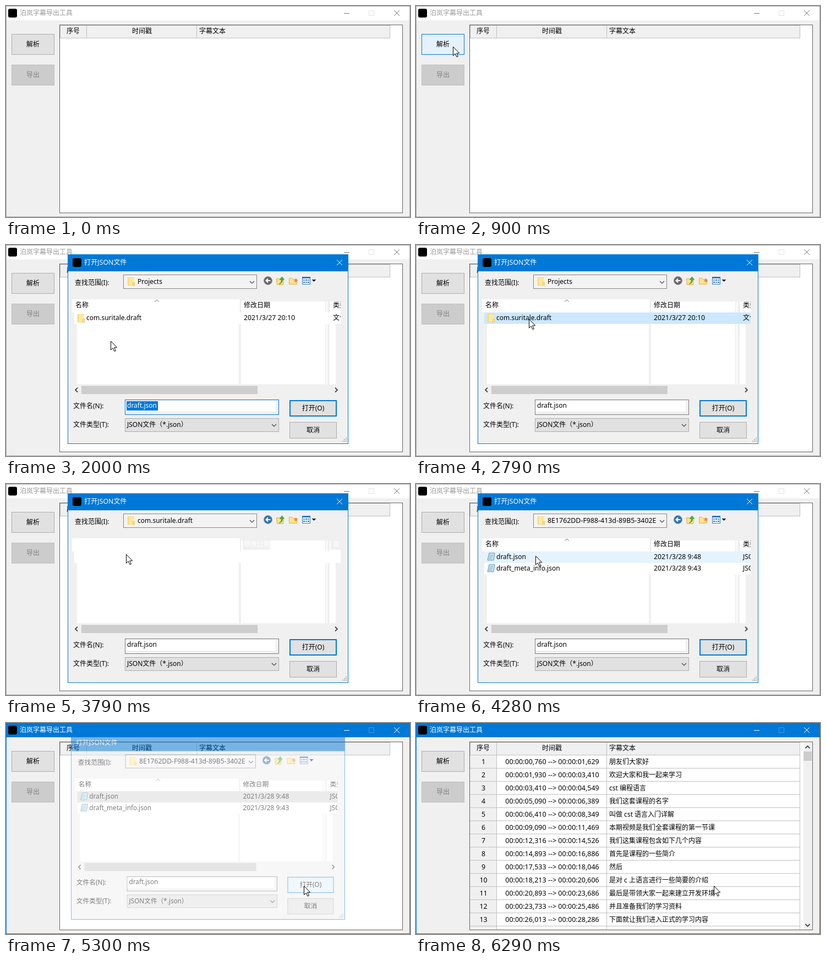
Recreate the animation shown at these times as an HTML page. Size 734 px wide and 385 px high, loop 8000 ms.

```html
<!DOCTYPE html>
<html lang="zh-CN">
<head>
<meta charset="utf-8">
<style>
html, body { margin: 0; width: 100%; height: 100%; overflow: hidden; }
body > svg { display: block; width: 734px; height: 385px; }
text { font: 12px "Noto Sans", "Noto Sans CJK SC", "Noto Sans CJK", sans-serif; white-space: pre; }
</style>
</head>
<body>
<svg id="stage" viewBox="0 0 734 385"></svg>
<script>
const LOOP = 8000;
const BLUE = '#0078d7', FACE = '#f0f0f0', GRID = '#c0c0c0';
const GUID = '8E1762DD-F988-413d-89B5-3402E7A1C95F';
const FOLDER = 'com.suritale.draft';

const LINES = [
  ['00,760', '01,629', '朋友们大家好'],
  ['01,930', '03,410', '欢迎大家和我一起来学习'],
  ['03,410', '04,549', 'cst 编程语言'],
  ['05,090', '06,389', '我们这套课程的名字'],
  ['06,410', '08,349', '叫做 cst 语言入门详解'],
  ['09,090', '11,469', '本期视频是我们全套课程的第一节课'],
  ['12,316', '14,526', '我们这集课程包含如下几个内容'],
  ['14,893', '16,886', '首先是课程的一些简介'],
  ['17,533', '18,046', '然后'],
  ['18,213', '20,606', '是对 c 上语言进行一些简要的介绍'],
  ['20,893', '23,686', '最后是带领大家一起来建立开发环境'],
  ['23,733', '25,486', '并且准备我们的学习资料'],
  ['26,013', '28,286', '下面就让我们进入正式的学习内容']
];

// start of each phase and its step length, ms
const PHASES = [[0, 999], [120, 78], [990, 999], [1140, 80], [2000, 79], [2790, 999], [3010, 999],
  [3240, 85], [3410, 999], [3570, 999], [3790, 999], [3870, 999], [4120, 78.8], [4910, 999],
  [5030, 999], [5140, 999], [5220, 80], [5840, 75], [6290, 9999]];

// pointer path: time, x, y
const PATH = [[120, 408, 351], [300, 350, 304], [700, 112, 112], [900, 67, 74], [1380, 67, 74],
  [1940, 190, 175], [2000, 190, 175], [2400, 205, 135], [3200, 205, 135], [3410, 218, 128],
  [4120, 218, 128], [4360, 216, 133], [4829, 505, 263], [4910, 526, 284], [5030, 541, 297]];

function snap(t) {
  const [start, step] = PHASES.findLast(p => p[0] <= t);
  return start + Math.floor((t - start) / step) * step;
}

function pointer(t) {
  const i = PATH.findLastIndex(p => p[0] <= t), a = PATH[i], b = PATH[i + 1];
  if (!b) return [a[1], a[2]];
  const u = (t - a[0]) / (b[0] - a[0]);
  return [a[1] + (b[1] - a[1]) * u, a[2] + (b[2] - a[2]) * u];
}

const rect = (x, y, w, h, fill, more = '') =>
  `<rect x="${x}" y="${y}" width="${w}" height="${h}" fill="${fill}" ${more}/>`;
const box = (x, y, w, h, fill, line, lw = 1) =>
  rect(x + lw / 2, y + lw / 2, w - lw, h - lw, fill, `stroke="${line}" stroke-width="${lw}"`);
const path = (d, line, lw = 1, fill = 'none') =>
  `<path d="${d}" fill="${fill}" stroke="${line}" stroke-width="${lw}"/>`;
const text = (x, cy, s, fill = '#000', size = 12, anchor = 'start') =>
  `<text x="${x}" y="${cy + 4}" fill="${fill}" text-anchor="${anchor}" style="font-size:${size}px">${s}</text>`;
const mid = (x, cy, s, fill, size) => text(x, cy, s, fill, size, 'middle');
const clip = (x, y, w, h, s) =>
  `<svg x="${x}" y="${y}" width="${w}" height="${h}" viewBox="${x} ${y} ${w} ${h}">${s}</svg>`;
const cross = (x, y, line) => path(`M${x} ${y}l10 10m0 -10l-10 10`, line);
const chevron = (x, y, dx, dy, lw = 1.2) => // dx, dy point the way
  path(dy ? `M${x - 4} ${y - 2 * dy}l4 ${4 * dy}l4 ${-4 * dy}` : `M${x - 2 * dx} ${y - 4}l${4 * dx} 4l${-4 * dx} 4`, '#444', lw);

function button(x, y, w, h, label, state = 'normal', lw = 1) {
  const [fill, line, ink] = {
    normal: ['#e1e1e1', '#adadad', '#000'],
    main: ['#e1e1e1', BLUE, '#000'],
    fading: ['#e3e9ef', '#5c9bd0', '#000'],
    hover: ['#e5f1fb', BLUE, '#000'],
    pressed: ['#cce4f7', '#005499', '#000'],
    disabled: ['#cccccc', '#bfbfbf', '#838383']
  }[state];
  return box(x, y, w, h, fill, line, lw) + mid(x + w / 2, y + h / 2, label, ink);
}

function table(t) {
  let s = box(97, 34, 624, 344, '#fff', '#646464') + box(98, 35, 600, 24, FACE, GRID);
  s += mid(122, 46, '序号') + mid(247, 46, '时间戳') + text(351, 46, '字幕文本');
  let bottom = 59;
  if (t >= 5380) {
    bottom = 377;
    s += rect(98, 59, 48, 318, FACE);
    LINES.forEach(([from, to, words], i) => {
      const y = 71 + 24 * i;
      s += mid(122.5, y, i + 1, '#000', 12.4) +
        mid(247.5, y, `00:00:${from} --&gt; 00:00:${to}`, '#000', 12.5) + text(351, y, words) +
        path(`M98 ${y + 11.5}H697`, GRID);
    });
    // rows keep loading, so the thumb shrinks
    const thumb = Math.max(17, 309 * 13 / ((t - 5310) * .243));
    s += rect(704, 36, 16, 341, FACE) + rect(704, 52, 15, thumb, '#cdcdcd') +
      chevron(711.5, 44, 0, -1, 1.8) + chevron(711.5, 369, 0, 1, 1.8);
  }
  return s + path(`M146.5 35V${bottom}M346.5 35V${bottom}M697.5 35V${bottom}`, GRID);
}

function mainWindow(t, px, py) {
  const active = t >= 990 && t < 1140 || t >= 5220;
  const ink = active ? '#fff' : '#999';
  let state = 'normal';
  if (t >= 120 && t < 990 && px >= 10 && px < 88 && py >= 51 && py < 89) state = 'hover';
  if (t >= 990 && t < 1140) state = 'pressed';
  if (t >= 1140 && t < 1460) state = 'fading';
  return box(0, 0, 734, 385, FACE, active ? BLUE : '#a9a9a9') +
    rect(1, 1, 732, 25, active ? BLUE : '#fff') +
    rect(4, 5, 16, 16, '#000', 'rx="3"') + text(25, 13, '泊岚字幕导出工具', ink) +
    path('M614 13.5h10', active ? '#fff' : '#777') + box(659, 8, 10, 10, 'none', active ? '#3f98df' : '#e2e2e2') +
    cross(705, 8, active ? '#fff' : '#777') +
    button(10, 51, 78, 38, '解析', state) + button(10, 107, 78, 38, '导出', 'disabled') + table(t);
}

const folder = (x, y) => rect(x, y, 12, 15, '#f7d774') + rect(x + 2, y + 1, 10, 13, '#ffe9a2') +
  path(`M${x + 9.5} ${y + 9}v6h3v-6z`, '#f0c850', 1, '#ffe08a');
const note = (x, y) => path(`M${x + 3} ${y}h10l-2 13h-11z`, '#5d91ad', 1, '#c5e6f2') +
  path(`M${x + 4} ${y + 4}h6m-7 3h6m-7 3h6`, '#6ea9c2');

function toolbar(t) {
  let s = `<circle cx="476" cy="65" r="7.5" fill="${t < 3010 ? '#686868' : '#2a75b3'}" stroke="#999"/>` +
    path('M480.5 65h-8m3.500 -3.500l-3.500 3.500l3.500 3.500', '#fff', 2);
  s += path('M491.5 61.500h5l2 2h6l-1 9h-11z', '#d9b244', 1, '#ffe08a') +
    path('M496 71q5 -2 4 -8h-3l4.500 -5l4 5h-3q0 7 -6.500 8z', '#2c8a2c', .7, '#46b546');
  s += path('M514.5 60.500h5l2 2h7v9h-14z', '#e0b24a', 1, '#ffe28f') +
    path('M523 65h7m-3.500 -3.500v7m-2.500 -6l5 5m0 -5l-5 5', '#e8732c');
  s += box(538, 58, 15, 14, '#fff', '#2878c8') + rect(538, 58, 15, 3, '#2878c8');
  for (let i = 0; i < 6; i++) s += rect(540 + i % 3 * 4, 63 + (i > 2) * 4, 3, 2, i % 2 ? '#2b66a8' : '#4b8fd0');
  return s + path('M555.500 63h8l-4 4z', 'none', 0, '#222');
}

function listRow(y, icon, name, date, kind, fill = '#fff', size = 12) {
  return rect(124, y, 484, 21, fill) + icon(130, y + 3) +
    text(146, y + 10, name, '#000', size) + text(432, y + 10, date, '#000', 12.3) + text(594, y + 10, kind);
}

function list(t, py) {
  const closing = t >= 5220;
  let s = rect(120, 99, 305, 24, '#fff') + rect(129, 144, 294, 110, '#fff') + rect(427, 103, 153, 151, '#fff') +
    rect(582, 103, 2, 151, '#fff') + rect(588, 103, 20, 20, '#fff') + rect(588, 144, 11, 110, '#fff');
  if (t >= 3790 && t < 3870) {
    s += rect(124, 123, 484, 21, '#fff') + rect(430, 103, 50, 17, FACE) + rect(590, 103, 18, 17, FACE) +
      text(432, 110, '修改日期', '#fff') + text(594, 110, '类', '#fff');
  } else {
    s += text(126, 110, '名称') + text(432, 110, '修改日期') + text(594, 110, '类型') +
      path('M270 103.500l4 -3.500l4 3.500', '#777') + path('M425.500 99V122M587.500 103V122', '#e4e4e4');
    if (t < 3010) {
      const over = t >= 2000 && py < 144;
      s += listRow(123, folder, FOLDER, '2021/3/27 20:10', '文件夹', t >= 2600 ? '#cce8ff' : over ? '#e5f3ff' : '#fff');
    } else if (t < 3790) {
      s += listRow(123, folder, GUID, '2021/3/28 9:48', '文件夹', t >= 3570 ? '#cce8ff' : '#fff', 12.4);
    } else {
      const fill = closing ? '#d9d9d9' : t >= 4350 ? '#cce8ff' : t >= 4120 ? '#e5f3ff' : '#fff';
      s += listRow(123, note, 'draft.json', '2021/3/28 9:48', 'JSON', fill) +
        listRow(144, note, 'draft_meta_info.json', '2021/3/28 9:43', 'JSON');
    }
  }
  return clip(113, 97, 495, 159, s) + chevron(128, 264.5, -1, 0, 1.8) + chevron(600, 264.5, 1, 0, 1.8) +
    rect(137, 257, 320, 15, '#cdcdcd');
}

function dialog(t, py) {
  const closing = t >= 5220, picked = t < 2600;
  const place = t < 3010 ? 'Projects' : t < 3870 ? FOLDER : GUID;
  let s = box(112, 17, 510, 346, FACE, BLUE) + rect(112, 17, 510, 31, BLUE);
  if (!closing) s += rect(121, 24, 16, 16, '#000', 'rx="3"') + cross(601, 27, '#fff');
  s += text(closing ? 121 : 142, 32, '打开JSON文件', '#fff', 12.2);

  s += text(125, 69, '查找范围(I):') + box(213, 54, 243, 26, '#f3f3f3', '#858585') + folder(221, 59) +
    clip(236, 56, 200, 22, text(239, 67, place, '#000', place == GUID ? 12.4 : 12)) + chevron(447, 68, 0, 1) + toolbar(t);
  s += list(t, py);

  s += text(122, 294, '文件名(N):') + box(216, 282, 280, 28, FACE, picked ? BLUE : '#7a7a7a') +
    rect(217, 284, 273, 20, '#fff') + (picked ? rect(219, 285, 57, 17, BLUE) : '') +
    text(220, 293, 'draft.json', picked ? '#fff' : '#000');
  s += text(122, 328, '文件类型(T):') + box(216, 316, 280, 25, '#e1e1e1', '#adadad') +
    text(220, 328, 'JSON文件（*.json）') + chevron(487, 329, 0, 1);

  const open = t < 5030 ? 'main' : t >= 5140 && t < 5220 ? 'pressed' : 'hover';
  s += button(515, 283, 86, 30, '打开(O)', open, open == 'main' ? 2 : 1) + button(515, 323, 86, 30, '取消');
  for (const [x, y] of [[617, 351], [614, 354], [617, 354], [611, 357], [614, 357], [617, 357]]) s += rect(x, y, 2, 2, '#b8b8b8');

  let alpha = 1, shrink = .054;
  if (closing) {
    alpha = 1 - (t - 5140) / 320;
    shrink = .048;
  } else {
    alpha = 1 - (1 - Math.min(1, (t - 1100) / 410)) ** 2;
  }
  const k = 1 - shrink * (1 - alpha);
  return `<g opacity="${alpha}" transform="translate(367 190) scale(${k}) translate(-367 -190)">${s}</g>`;
}

const stage = document.getElementById('stage');
let shown = -1;

function frame() {
  const t = snap(performance.now() % LOOP);
  if (t !== shown) {
    shown = t;
    const [x, y] = t < 120 ? [-99, -99] : pointer(t).map(Math.round);
    let s = mainWindow(t, x, y);
    if (t >= 1140 && t < 5460) s += dialog(t, y);
    s += path(`M${x + .5} ${y + .5}v16l3.700 -3.500l2.800 6l2.400 -1l-2.700 -6h5z`, '#000', 1, '#fff');
    stage.innerHTML = s;
  }
  requestAnimationFrame(frame);
}
frame();
</script>
</body>
</html>
```
